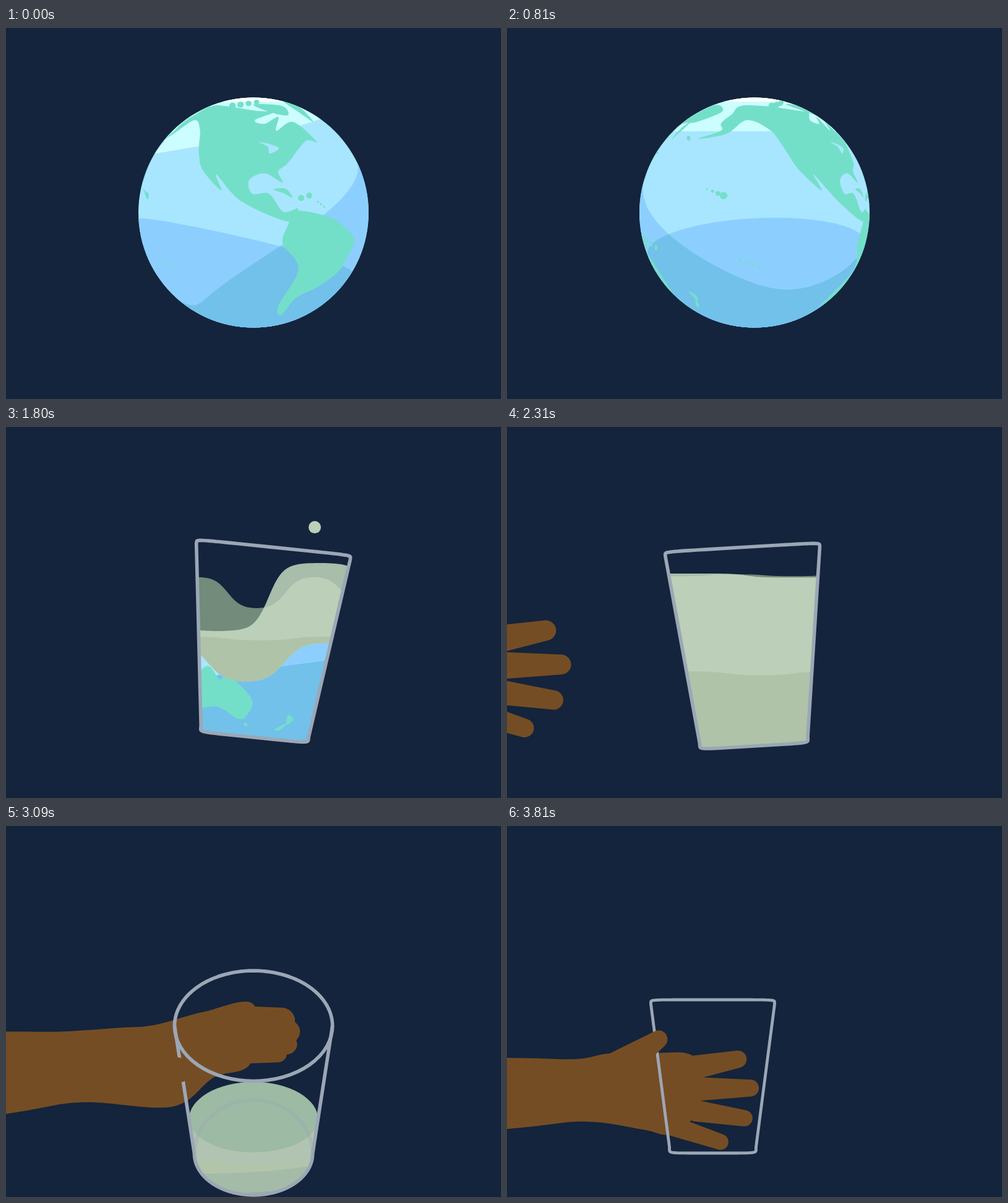
An HTML page with a canvas for the animation above (3.84 s loop, 800 by 600 pixels).

```html
<!DOCTYPE html>
<html lang="en">
<head>
<meta charset="utf-8">
<title>Globe to glass</title>
<style>
html, body { margin: 0; width: 100%; height: 100%; overflow: hidden; background: #13243c; }
canvas { display: block; }
</style>
</head>
<body>
<canvas id="stage" width="800" height="600"></canvas>
<script>
const ctx = document.getElementById('stage').getContext('2d');
const LOOP = 3840, STEP = 30;
const CX = 400, CY = 298.5, R = 186, SPIN = 0.001143;
const { PI, sin, cos, min, max, abs } = Math;
const C = {
  night: '#13243c', light: '#a8e6ff', mid: '#8ccfff', deep: '#72c1ea', cap: '#ccfeff',
  land: '#74dfc8', glass: '#9ca7b5', skin: '#754d24',
  liquid: '#bccfb8', front: '#a8bdaa', back: '#728b7a', band: '#afc3a9', top: '#9dbaa4'
};

const lerp = (a, b, u) => a + (b - a) * u;
const mix = (p, q, u) => p.map((v, i) => lerp(v, q[i], u));
const pairs = list => list.reduce((out, v, i) => (i % 2 ? out[out.length - 1].push(v) : out.push([v]), out), []);

// Eased 0 to 1 between two times.
function ramp(t, from, to) {
  const u = max(0, min(1, (t - from) / (to - from)));
  return u * u * (3 - 2 * u);
}

// Each key is [time, ...values]; values ease from key to key.
const track = (keys, t) => keys.reduce((now, key, i) =>
  i ? mix(now, key, ramp(t, keys[i - 1][0], key[0])) : key).slice(1);

function blob(p) {
  const path = new Path2D(), n = p.length;
  path.moveTo(...p[0]);
  p.forEach((b, i) => {
    const a = p[(i + n - 1) % n], c = p[(i + 1) % n], d = p[(i + 2) % n];
    path.bezierCurveTo(b[0] + (c[0] - a[0]) / 6, b[1] + (c[1] - a[1]) / 6,
      c[0] - (d[0] - b[0]) / 6, c[1] - (d[1] - b[1]) / 6, c[0], c[1]);
  });
  path.closePath();
  return path;
}

function fill(path, color) {
  ctx.fillStyle = color;
  ctx.fill(path);
}

function disc(x, y, rx, ry, color) {
  const path = new Path2D();
  path.ellipse(x, y, rx, ry, 0, 0, 2 * PI);
  fill(path, color);
}

function clipped(path, draw) {
  ctx.save();
  ctx.clip(path);
  draw();
  ctx.restore();
}

/* ---------- globe ---------- */

const ringAt = y => Math.sqrt(max(1, R * R - (y - CY) ** 2));

// Turns key points seen at time t0 into [longitude at time 0, y].
const trace = (t0, ...list) => pairs(list).map(([x, y]) =>
  [Math.asin(max(-1, min(1, (x - CX) / ringAt(y)))) - SPIN * t0, y]);

// A row of islands, each one smaller than the last.
const chain = (t0, count, x, y, dx, dy, r, shrink = 1) => Array.from({ length: count }, (_, i) =>
  [...trace(t0, x + dx * i, y + dy * i)[0], r * shrink ** i]);

const northAmerica = [
  ...trace(810, 309,179, 346,166, 346,154, 364,139, 378,126, 425,127),
  ...trace(0, 405,134, 433,136, 402,149, 418,155, 440,144, 437,166, 464,152, 502,184, 484,183, 456,218, 440,232, 447,250,
    418,235, 393,246, 398,268, 425,268, 448,297, 472,292, 456,313, 380,280, 340,237, 348,263, 318,230, 312,205),
  ...trace(810, 445,190, 425,165, 388,149, 355,171)
];
const southAmerica = trace(0, 456,318, 468,296, 515,303, 540,316, 563,342, 550,372, 538,393, 505,418, 468,437,
  445,464, 440,450, 470,400, 469,376, 447,348);
const asia = trace(1290, 222,262, 243,208, 290,154, 350,125, 393,135, 355,152, 320,154, 289,165, 280,187, 244,214);
const australia = trace(1800, 262,385, 291,352, 305,348, 320,368, 335,362, 372,400, 365,425, 350,432, 315,412, 265,418);
const lands = [
  northAmerica, southAmerica, asia, australia,
  trace(0, 432,261, 452,260, 463,274, 448,267),
  trace(0, 450,119, 480,128, 497,152, 470,134),
  trace(0, 400,124, 446,126, 456,141, 430,137),
  trace(1290, 340,149, 313,180, 322,162),
  trace(1290, 268,208, 250,232, 258,216),
  trace(1290, 233,327, 272,349, 270,360, 242,344),
  trace(1290, 353,426, 366,433, 360,441),
  trace(1290, 359,439, 356,450, 348,449)
];
const lakes = trace(0, 409,185, 427,188, 441,195, 426,203, 423,192);
const islands = [
  ...chain(0, 4, 366, 126, 13, -2, 6, 0.9),
  ...chain(0, 2, 477, 275, 13, -4, 5.5),
  ...chain(0, 3, 504, 281, 5, 4, 2),
  ...chain(810, 4, 350, 271, -9, -3.5, 6.5, 0.65),
  ...chain(810, 4, 376, 375, 11, 4, 2.5),
  ...chain(1290, 2, 277, 201, -33, 21, 4),
  ...chain(1290, 3, 225, 260, -1, 20, 3),
  ...chain(1290, 3, 279, 343, 13, 6, 5),
  ...chain(1290, 1, 358, 178, 0, 0, 4.5),
  ...chain(1290, 1, 306, 441, 0, 0, 3)
];

function drawLand(points, turn, color) {
  if (!points.some(([lon]) => abs(lon + turn) < PI / 2)) return;
  fill(blob(points.map(([lon, y]) =>
    [CX + ringAt(y) * sin(max(-PI / 2, min(PI / 2, lon + turn))), y])), color);
}

// Region under (or over) the tilted ring y = c + u cos(lon) + v sin(lon).
function ringRegion(c, u, v, edge) {
  const path = new Path2D();
  path.moveTo(0, edge);
  path.lineTo(0, c - v);
  for (let i = -30; i <= 30; i++) {
    const lon = i * PI / 60, y = c + u * cos(lon) + v * sin(lon);
    path.lineTo(CX + ringAt(y) * sin(lon), y);
  }
  path.lineTo(800, c + v);
  path.lineTo(800, edge);
  path.closePath();
  return path;
}

function drawGlobe(t) {
  const shift = ramp(t, 1380, 1800), turn = SPIN * t;
  const swing = cos(2 * PI * t / 1600), calm = 1 - ramp(t, 1290, 1800);
  const bulge = (38 * cos(2 * PI * (t - 1350) / 1100) - 15) * calm;
  const warm = ringRegion(350 - 0.2 * bulge, bulge, 71 * Math.exp(-t / 600) - 28, 700);
  const cold = ringRegion(309 + 16 * swing, (88 - 32 * swing) * calm, -30 - 80 * swing, 700);
  ctx.save();
  ctx.translate(25 * shift, 40 * shift);
  ctx.fillStyle = C.light;
  ctx.fillRect(-100, -100, 1000, 900);
  fill(warm, C.mid);
  fill(cold, C.mid);
  clipped(warm, () => fill(cold, C.deep));
  fill(ringRegion(171 + 4 * swing, 0, -14 - 14 * swing, 0), C.cap);
  fill(ringRegion(119, 0, 0, 0), '#fff');
  lands.forEach(p => drawLand(p, turn, C.land));
  drawLand(lakes, turn, C.light);
  islands.forEach(([lon, y, r]) => {
    const facing = cos(lon + turn);
    if (facing > 0) disc(CX + ringAt(y) * sin(lon + turn), y, r * max(0.3, facing), r * 0.9, C.land);
  });
  ctx.restore();
}

/* ---------- glass ---------- */

// time, top edge, bottom edge, pitch towards the viewer
const poses = [[1800, 193, 502, 0], [2100, 194, 516, 0], [2690, 194, 516, 0], [2820, 201, 528, 0.23],
  [3080, 234, 597, 0.7], [3360, 246, 561, 0.44], [3630, 275, 531, 0], [3810, 281, 529, 0]];

// Half of a superellipse: n = 2 is round, a larger n is squarer.
function halfOval(rx, ry, n) {
  return Array.from({ length: 61 }, (_, i) => {
    const c = -cos(PI * i / 60), s = max(0, sin(PI * i / 60));
    return [Math.sign(c) * abs(c) ** (2 / n) * rx, ry * s ** (2 / n)];
  });
}

function swayAt(t) {
  const d = t - 1610;
  return 15 * ramp(t, 1380, 1610) * (1 - ramp(t, 2300, 2700)) * Math.exp(-d / 500) * cos(PI * d / 620);
}

function glassAt(t) {
  const [head, foot0, pitch] = track(poses, t);
  const sway = swayAt(t), away = ramp(t, 3360, 3810), formed = ramp(t, 1370, 1610);
  const half = 125 * (1 + 0.03 * pitch) * (1 - 0.2 * away), base = half * (0.7 + 0.07 * pitch);
  const rimH0 = max(7, half * pitch), baseH0 = max(10, base * pitch);
  const square = lerp(8, 2, min(1, pitch / 0.27));
  const [rx, bx, rimY, rimH, baseY, baseH, n] = mix([R, R, CY, R, CY, R, 2],
    [half, base, head + rimH0, rimH0, foot0 - baseH0, baseH0, square], formed);
  const cx = CX - 67.5 * away + sway * 0.2, foot = baseY + baseH, a = sway * PI / 180;
  const outline = new Path2D();
  [...halfOval(rx, rimH, n).map(([x, y]) => [x, rimY - y]),
    ...halfOval(bx, baseH, n).map(([x, y]) => [x, baseY + y]).reverse()].forEach(([x, y]) => {
    const d = y - foot;
    outline.lineTo(cx + x * cos(a) - d * sin(a), foot + x * sin(a) + d * cos(a));
  });
  outline.closePath();
  return { cx, rx, bx, rimY, baseY, baseH, foot, outline, lip: half * pitch, width: lerp(5.6, 4.8, away) };
}

function drawGlass(g, t) {
  const arc = (y, rx, ry, from) => {
    ctx.beginPath();
    ctx.ellipse(g.cx, y, rx, ry, 0, from, from + PI);
    ctx.stroke();
  };
  ctx.strokeStyle = C.glass;
  ctx.lineJoin = 'round';
  ctx.lineWidth = g.width;
  ctx.globalAlpha = ramp(t, 1420, 1580);
  ctx.stroke(g.outline);
  if (g.lip > 2) {
    arc(g.rimY, g.rx, g.lip, 0);
    ctx.globalAlpha = 0.35;
    arc(g.baseY, g.bx, g.baseH * 1.3, PI);
  }
  ctx.globalAlpha = 1;
}

/* ---------- liquid ---------- */

// A wave whose slopes steepen with sharp.
function waveRegion(level, size, trough, half, sharp = 1.2) {
  const path = new Path2D();
  path.moveTo(180, 700);
  for (let x = 180; x <= 640; x += 5) {
    const swell = Math.tanh(sharp * cos((x - trough) / half * PI)) / Math.tanh(sharp);
    path.lineTo(x, level + size * swell);
  }
  path.lineTo(640, 700);
  path.closePath();
  return path;
}

function drawSlosh(g, t) {
  const pour = ramp(t, 1340, 1800), rest = ramp(t, 1800, 2400), drift = (t - 1800) * 0.25;
  const level = (middle, end) => lerp(lerp(60, middle, pour), end, rest);
  const strength = pour * (1 - rest);
  const front = waveRegion(level(275, 238), 55 * strength, 342 + drift, 165, 2.2);
  const back = waveRegion(level(268, 238), 25 * strength, 405 - drift, 93);
  const earth = waveRegion(level(381, 580), 31 * strength, 388 + drift, 124);
  clipped(g.outline, () => {
    if (pour > 0) {
      fill(back, C.back);
      fill(front, C.front);
      clipped(front, () => {
        fill(back, C.liquid);
        fill(waveRegion(level(342, 402), 3, 410, 110), C.band);
      });
    }
    clipped(earth, () => drawGlobe(t));
  });
}

function drawDrop(t) {
  if (t < 1420 || t > 1860) return;
  disc(499 + (t - 1800) * 0.1, 72 + 0.00278 * (t - 1620) ** 2, 10, 10, C.liquid);
}

function drawLiquid(g, t) {
  const level = lerp(0.12, 1, ramp(t, 2850, 3230));
  if (level > 0.99) return;
  const y = lerp(g.rimY, g.baseY, level), rx = lerp(g.rx, g.bx, level);
  const up = lerp(g.lip * 0.48, g.baseH, level), down = lerp(g.lip * 0.2, g.baseH, level);
  const depth = k => lerp(y, g.foot, k);
  const band = (x, left, middle, right, color) => {
    const p = new Path2D();
    p.moveTo(x, depth(left));
    p.quadraticCurveTo(400, depth(middle), 520, depth(right));
    p.lineTo(520, 700);
    p.lineTo(x, 700);
    fill(p, color);
  };
  clipped(g.outline, () => {
    ctx.globalAlpha = 0.94;
    ctx.fillStyle = C.liquid;
    ctx.fillRect(180, y, 460, 500);
    ctx.globalAlpha = 0.8;
    band(280, 0.48, 0.66, 0.59, '#b3c6ab');
    band(280, 0.71, 0.75, 0.58, '#a2bba7');
    band(350, 1, 0.94, 0.94, '#95b19c');
    ctx.globalAlpha = 1;
    if (g.lip < 2) return;
    const surface = new Path2D();
    surface.ellipse(g.cx, y, rx, up, 0, PI, 2 * PI);
    surface.ellipse(g.cx, y, rx, down, 0, 0, PI);
    fill(surface, C.top);
    if (level < 0.4) {
      fill(blob(pairs([370,0, 388,16, 395,22, 402,15, 411,6, 419,11, 436,0])
        .map(([x, d]) => [x, y + 2 + d * min(1, g.lip / 29)])), C.top);
    }
  });
}

/* ---------- hand ---------- */

const palmOpen = pairs([-400,372, 0,375, 110,377, 165,368, 240,367, 300,372, 318,425, 296,478, 260,499, 220,491, 125,478, 0,490, -400,525]);
const palmFist = pairs([-323,380, 5,380, 79,380, 152,375, 202,371, 267,353, 333,343, 329,423, 280,443, 225,483, 107,477, 5,493, -323,547]);

// A finger: base x, y, radius, then tip x, y, radius.
function openFinger(i) {
  const a = (9.7 * i - 10.7) * PI / 180, reach = 295 - 11 * (i - 1.2) ** 2;
  const at = r => [99 + r * cos(a), 429 + r * sin(a)];
  return [...at(reach - 80), 20 - 1.3 * i, ...at(reach), 14 - 0.4 * i];
}

function curledFinger(i) {
  const a = (36 * i - 48) * PI / 180, x = 351 + 28 * cos(a), y = 386 + 28 * sin(a), r = 18 - 2 * i;
  return [x - 50, y, r + 2, x, y, r];
}

function drawFinger([x, y, r, x2, y2, r2]) {
  const a = Math.atan2(y2 - y, x2 - x), s = Math.acos((r - r2) / Math.hypot(x2 - x, y2 - y));
  const path = new Path2D();
  path.arc(x, y, r, a + s, a - s);
  path.arc(x2, y2, r2, a - s, a + s);
  path.closePath();
  fill(path, C.skin);
}

function drawPalm(fist) {
  fill(blob(palmOpen.map((p, i) => mix(p, palmFist[i], fist))), C.skin);
  for (let i = 0; i < 4; i++) drawFinger(mix(openFinger(i), curledFinger(i), fist));
}

const drawThumb = fist => drawFinger(mix([170, 397, 28, 245, 345, 14.5], [170, 427, 28, 233, 433, 17], fist));

function inHand(t, draw) {
  if (t < 2160) return;
  const near = 1 - ramp(t, 3360, 3810), reach = ramp(t, 2160, 2640);
  ctx.save();
  ctx.transform(1 + 0.22 * near, 0, 0, 1 + 0.18 * near, -6 * near - 504 * (1 - reach), -116 * near);
  draw(ramp(t, 2850, 3090) - ramp(t, 3370, 3630));
  ctx.restore();
}

/* ---------- scene ---------- */

function render(t) {
  ctx.fillStyle = C.night;
  ctx.fillRect(0, 0, 800, 600);
  const g = glassAt(t);
  inHand(t, drawPalm);
  if (t < 2400) drawSlosh(g, t);
  else drawLiquid(g, t);
  drawDrop(t);
  if (t > 1420) drawGlass(g, t);
  inHand(t, drawThumb);
}

const start = performance.now();
function tick() {
  const t = (performance.now() - start) % LOOP;
  render(Math.floor(t / STEP) * STEP);
  requestAnimationFrame(tick);
}
tick();
</script>
</body>
</html>
```
